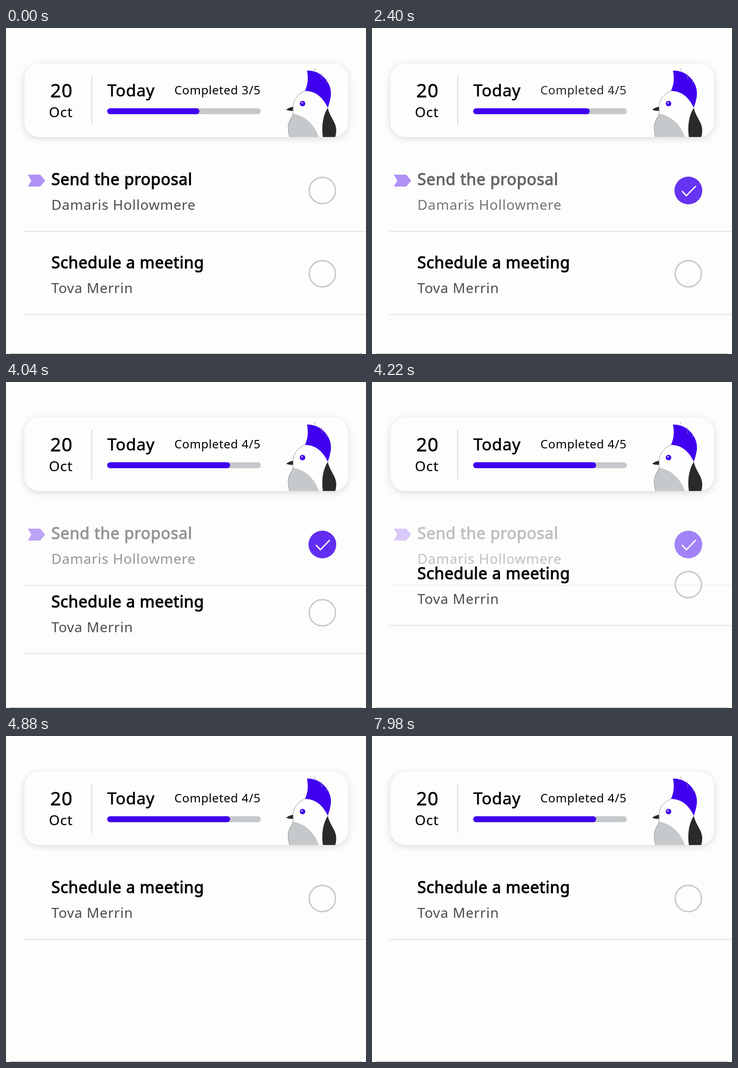
Animation of 726x658 px, one loop 8 s. Source, as an HTML page with a canvas:

```html
<!DOCTYPE html>
<html lang="en">
<head>
<meta charset="utf-8">
<title>Today's tasks</title>
<style>
  html, body { margin: 0; width: 100%; height: 100%; overflow: hidden; background: #fdfdfc; }
  canvas { display: block; }
</style>
</head>
<body>
<canvas id="stage" width="726" height="658"></canvas>
<script>
const ctx = document.getElementById('stage').getContext('2d');
const LOOP = 8000;
const PAPER = '#fdfdfc', INK = '#000', PURPLE = '#4000f0', LILAC = '#b091f5';
const GREY = '#c6c9cb', RING = '#c9cacd', RULE = '#dcdce2', DARK = '#2a2a2a';

// Steps advance three per 140 ms: 20, 100 and 20 ms long.
function stepAt(ms) {
  const rest = ms % 140;
  return Math.floor(ms / 140) * 3 + (rest < 20 ? 0 : rest < 120 ? 1 : 2);
}

function ease(step, start, span = 21.5) {
  const k = Math.min(1, Math.max(0, (step - start) / span));
  return (1 - Math.cos(Math.PI * k)) / 2;
}

// Weights between regular and bold are regular glyphs grown by a thin edge;
// the text is mixed with the paper so that fill and edge blend evenly.
function text(str, x, y, size, spacing, alpha = 1, edge = 0) {
  if (alpha <= 0) return;
  ctx.font = `400 ${size}px "Noto Sans", "Open Sans", sans-serif`;
  ctx.letterSpacing = spacing + 'px';
  const shade = Math.round(253 * (1 - alpha));
  const color = edge ? `rgb(${shade},${shade},${shade})` : INK;
  ctx.globalAlpha = edge ? 1 : alpha;
  ctx.fillStyle = ctx.strokeStyle = color;
  ctx.fillText(str, x, y);
  if (edge) {
    ctx.lineWidth = edge;
    ctx.lineJoin = 'miter';
    ctx.miterLimit = 2;
    ctx.strokeText(str, x, y);
  }
  ctx.globalAlpha = 1;
}

function line(x1, y1, x2, y2, color, width) {
  ctx.beginPath();
  ctx.moveTo(x1, y1);
  ctx.lineTo(x2, y2);
  ctx.strokeStyle = color;
  ctx.lineWidth = width;
  ctx.stroke();
}

function pill(x, y, w, h, r, color) {
  ctx.beginPath();
  ctx.roundRect(x, y, w, h, r);
  ctx.fillStyle = color;
  ctx.fill();
}

function disc(x, y, r, color) {
  ctx.beginPath();
  ctx.arc(x, y, r, 0, Math.PI * 2);
  ctx.fillStyle = color;
  ctx.fill();
}

function shape(d, color) {
  ctx.fillStyle = color;
  ctx.fill(new Path2D(d));
}

function outline(d, color, width) {
  ctx.strokeStyle = color;
  ctx.lineWidth = width;
  ctx.stroke(new Path2D(d));
}

function bird() {
  shape('M578 173 C602 176 622 194 631 220 H572 C567 204 569 190 574 182 Q578 178 578 173 Z', GREY);
  shape('M649 161 C653 180 666 190 666 206 Q666 214 664 220 H639 C636 198 639 176 649 161 Z', DARK);
  shape('M607 86 C634 84 659 110 655 138 Q653 150 649 161 C640 142 626 127 603 127 C609 113 610 102 607 86 Z', PURPLE);
  shape('M565 165 Q571 160 579 159 V167 Q572 168 565 165 Z', DARK);
  outline('M603 127 C588 133 579 146 579 159 V173 C576 184 569 188 569 200 Q569 211 572 220', '#808080', .8);
  outline('M622 81 L624 88 M636.500 91 V104 M646.500 104 V112', '#909090', .8);
  disc(598, 152.500, 5.500, PURPLE);
  disc(597, 151, 1.600, '#e6e0fa');
}

function header(done) {
  ctx.save();
  ctx.shadowColor = 'rgba(40,40,60,.17)';
  ctx.shadowBlur = 14;
  ctx.shadowOffsetY = 3;
  pill(37, 72, 653, 148, 30, PAPER);
  ctx.restore();

  text('20', 89.300, 140, 38, 1, 1, .6);
  text('Oct', 86.500, 180, 28, 1, 1, .2);
  line(173, 96, 173, 196, '#d3d3d8', 1.600);

  text('Today', 204.500, 138, 33, .8, 1, .7);
  text('Completed 3/5', 339.500, 134, 24, .6, 1 - done);
  text('Completed 4/5', 339.500, 134, 24, .6, done);
  pill(204, 162, 310, 12, 6, GREY);
  pill(204, 162, 186 + 62 * done, 12, 6, PURPLE);
  bird();
}

function arrow(alpha) {
  const d = 'M44 296 H69 L79 308 L69 320 H44 L51 308 Z';
  ctx.globalAlpha = alpha;
  shape(d, LILAC);
  ctx.globalAlpha = 1;
}

// y is the vertical middle of the check circle.
function task(title, person, y, done, alpha) {
  text(title, 91.500, y - 11, 32, .65, alpha * (1 - .5 * done), 1.1);
  text(person, 91.500, y + 39, 28, .8, alpha * (.7 - .2 * done));

  ctx.globalAlpha = alpha * (1 - done);
  ctx.beginPath();
  ctx.arc(638, y, 26.500, 0, Math.PI * 2);
  ctx.strokeStyle = RING;
  ctx.lineWidth = 3;
  ctx.stroke();

  ctx.globalAlpha = alpha * done;
  disc(638, y, 28, PURPLE);
  ctx.globalAlpha = alpha;
  line(36, y + 82.500, 726, y + 82.500, RULE, 1.600);
  ctx.globalAlpha = 1;
  if (done > 0) outline(`M625 ${y + 1} L634 ${y + 10.500} L653 ${y - 9}`, PAPER, 2.600);
}

function draw(ms) {
  const step = stepAt(ms);
  const done = ease(step, 37);
  const slide = ease(step, 80);

  ctx.fillStyle = PAPER;
  ctx.fillRect(0, 0, 726, 658);
  line(8, 657.500, 718, 657.500, '#a0a0a0', 1);

  header(done);
  if (slide < 1) {
    arrow(1 - slide);
    task('Send the proposal', 'Damaris Hollowmere', 328, done, 1 - slide);
  }
  task('Schedule a meeting', 'Tova Merrin', 496 - 168 * slide, 0, 1);
}

const start = performance.now();
function tick() {
  draw((performance.now() - start) % LOOP);
  requestAnimationFrame(tick);
}
tick();
</script>
</body>
</html>
```
